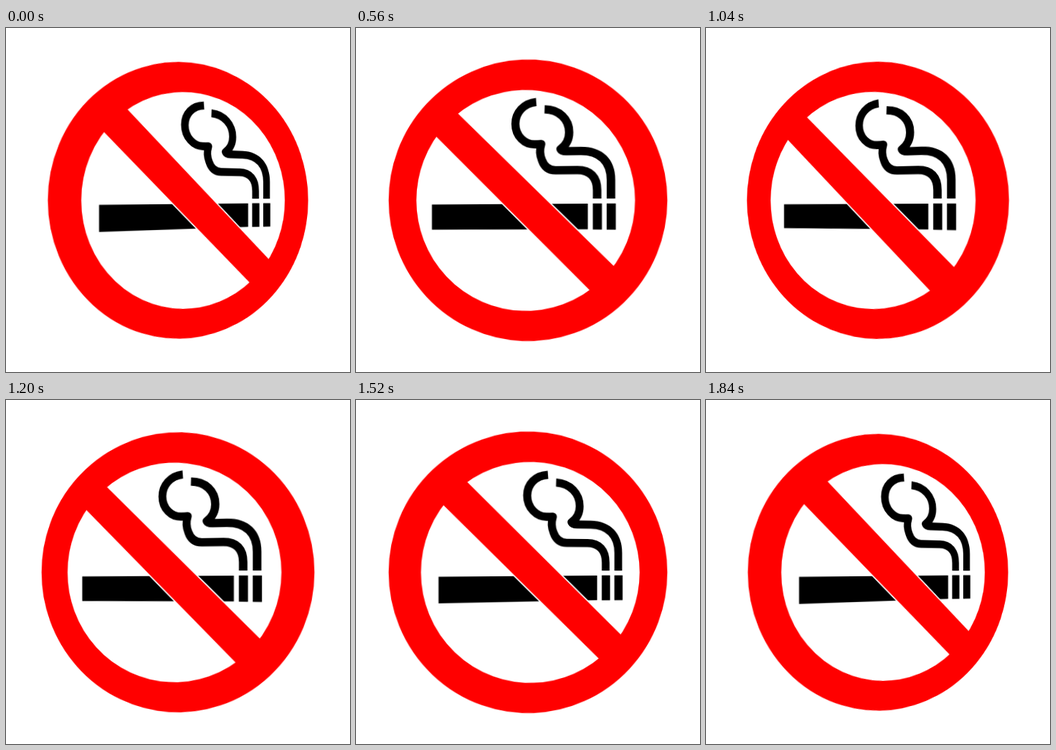
Write an HTML page that moves like this. It is 480 px wide and 480 px high and loops after 1920 ms.

```html
<!DOCTYPE html>
<html lang="en">
<head>
<meta charset="utf-8">
<title>No smoking sign</title>
<style>
  html, body { margin: 0; width: 100%; height: 100%; overflow: hidden; background: #fff; }
  #stage { position: relative; width: 100%; height: 100%; overflow: clip; contain: strict; }
  #sign {
    position: absolute; left: 0; top: 0; width: 480px; height: 480px;
    transform-origin: 240px 240.5px;
  }
</style>
</head>
<body>
<div id="stage">
<svg id="sign" viewBox="-240 -240.5 480 480">
  <g id="cigarette">
    <path d="M-131.4 6.1L91.4 4.5V39.7L-131.4 42.2Z"/>
    <path d="M98.2 4.2H110.5V40H98.2ZM116.9 4.2H129.2V40H116.9Z"/>
  </g>
  <g id="smoke" fill="none" stroke="#000" stroke-width="11.5" stroke-linejoin="round">
    <path d="M20 -137.3C2 -136 -9.5 -123 -9.5 -107.5C-9.5 -90 4 -78 18 -78.2Q23 -78.4 27 -78.5C25 -72 25 -63 28 -56C31.5 -46 38 -41.8 47 -41.8H77C95 -41.7 104 -32 104 -14V-2.5"/>
    <path d="M31.7 -126.7C52 -126 65.8 -112 65.8 -94C65.8 -84 61 -76 54 -71Q55.5 -68.1 62 -68.1H82C108 -68 122.7 -53 122.7 -28V-2.5"/>
  </g>
  <path id="bar" d="M-102.3 -133.5L136.1 99L103.2 132.5L-134.3 -101.1Z"
    fill="#f00" stroke="#fff" stroke-width="3.6" paint-order="stroke"/>
  <circle id="ring" r="176" fill="none" stroke="#f00" stroke-width="42.4"/>
</svg>
</div>
<script>
  const STEP = 80, POSES = 12, FRAMES = POSES * 2;
  const RADIUS = 197.2, MAX_TURN = 20.6 * Math.PI / 180;
  const DEPTH = 690, SHRINK = 0.026;

  // Turn about the vertical axis in perspective, kept centred on the stage.
  function pose(n) {
    const turn = MAX_TURN * Math.cos(Math.PI * n / (POSES - 1));
    const sin = Math.sin(turn);
    const k = sin / DEPTH;
    const sy = 1 - SHRINK * (sin / Math.sin(MAX_TURN)) ** 2;
    const sx = sy * Math.cos(turn);
    const edge = RADIUS * k;
    const shift = sx * RADIUS * edge / (1 - edge * edge);
    const m = [sx + shift * k, 0, 0, k, 0, sy, 0, 0, 0, 0, 1, 0, shift, 0, 0, 1];
    return `matrix3d(${m.map(v => v.toFixed(8)).join(",")})`;
  }

  const frames = [];
  for (let i = 0; i <= FRAMES; i++) {
    const n = i % FRAMES;
    frames.push({
      offset: i / FRAMES,
      transform: pose(Math.min(n, FRAMES - 1 - n)),
      easing: "steps(1, end)"
    });
  }
  document.getElementById("sign").animate(frames, { duration: STEP * FRAMES, iterations: Infinity });
</script>
</body>
</html>
```
